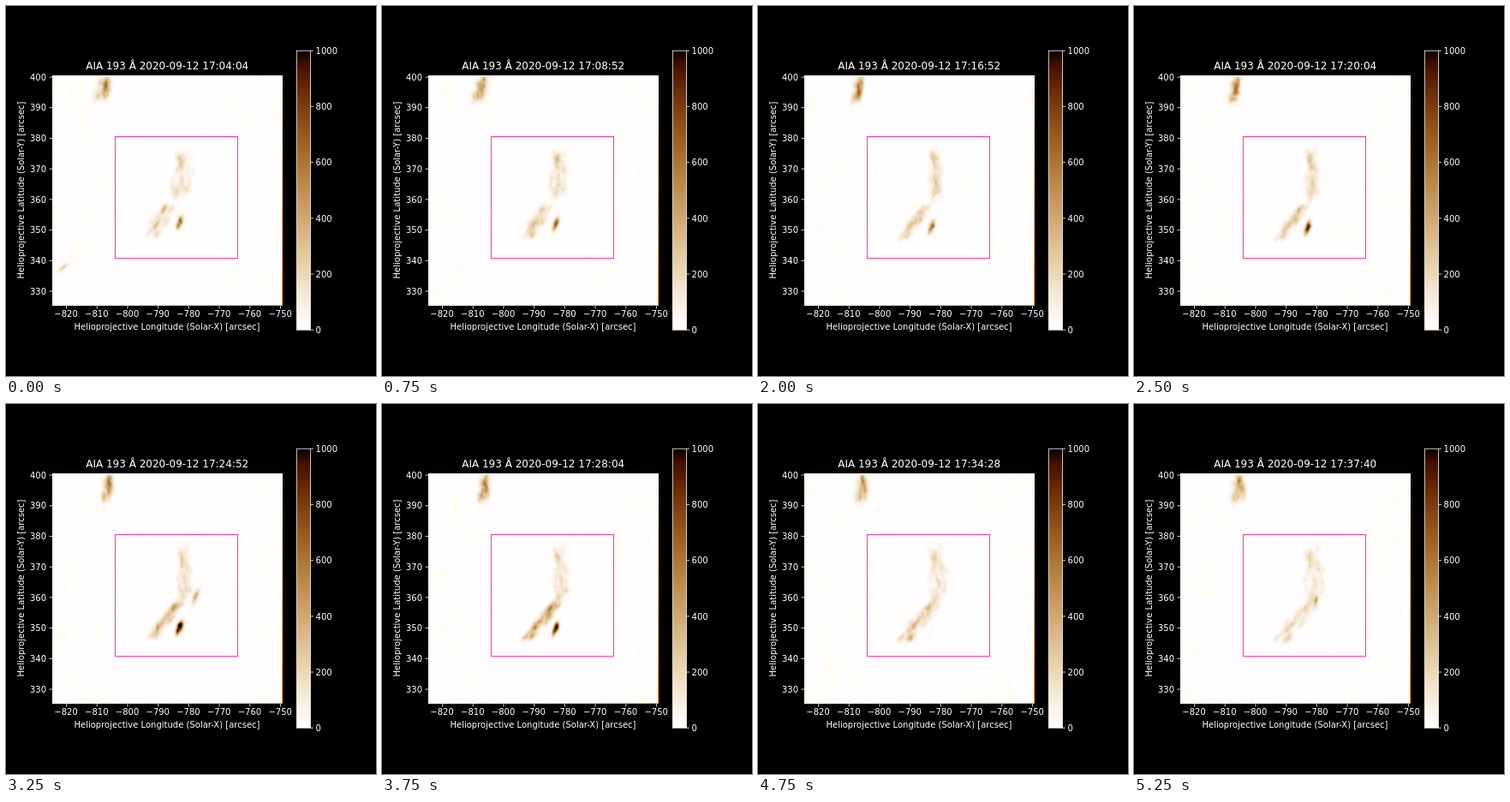
Write an HTML page with a canvas that moves like this. It is 432x432 px and loops after 5.5 s.

```html
<!DOCTYPE html>
<html lang="en">
<head>
<meta charset="utf-8">
<title>AIA 193 Å</title>
<style>
  html, body { margin: 0; width: 100%; height: 100%; overflow: hidden; background: #000; }
  canvas { position: absolute; left: 54px; top: 81px; }
  svg { position: absolute; left: 0; top: 0; }
  text { font-family: "DejaVu Sans", sans-serif; font-size: 10px; fill: #fff; }
  .title { font-size: 12px; }
  .mid { text-anchor: middle; }
  .end { text-anchor: end; }
  line { stroke: #fff; stroke-width: .8; }
  .frame, .roi { fill: none; }
  .roi { stroke: #ff35a0; }
  .bar { stroke: #fff6dc; stroke-width: .8; }
</style>
</head>
<body>
<canvas id="map" width="269" height="269"></canvas>
<svg id="plot" width="432" height="432" viewBox="0 0 432 432">
  <defs>
    <linearGradient id="ramp" x1="0" y1="1" x2="0" y2="0"></linearGradient>
    <linearGradient id="edge" x1="0" y1="0" x2="1" y2="1">
      <stop offset=".5" stop-color="#fffdf4"/>
      <stop offset="1" stop-color="#ff9a30"/>
    </linearGradient>
  </defs>
  <rect class="frame" x="54.5" y="81.5" width="268" height="268" stroke="url(#edge)"/>
  <rect class="roi" x="127.5" y="152.5" width="143" height="142"/>
  <rect class="bar" x="339.3" y="52.2" width="16.2" height="326" fill="url(#ramp)"/>
  <text class="title mid" id="title" x="188.2" y="74"></text>
  <text class="mid" x="188" y="378">Helioprojective Longitude (Solar-X) [arcsec]</text>
  <text class="mid" transform="translate(21 215) rotate(-90)">Helioprojective Latitude (Solar-Y) [arcsec]</text>
</svg>
<script>
const STEP = 250, STEPS = 22, LAST = STEPS - 1, LEFT = 54, TOP = 81;
const START = 17 * 3600 + 4 * 60 + 4, CADENCE = 96;
const svg = document.getElementById('plot');
const title = document.getElementById('title');
const canvas = document.getElementById('map');
const ctx = canvas.getContext('2d');

// Glowing strands: end points at the start and at the end of the loop.
const strands = [
  { from: [109, 108, 118, 84], to: [121, 113, 122, 84], spread: 8, amp: .07 },
  { from: [207, 170, 204, 222], to: [206, 168, 213, 230], spread: 15, amp: .075 },
  { from: [189, 232, 168, 268], to: [209, 231, 168, 276], spread: 10, amp: .06, peak: 16 }
];

// Brief brightenings: step, x, y, tilt, length, strength.
const flashes = [
  [0, 66, 305, 50, 7, .25],
  [0, 184, 237, 20, 5, .2],
  [6, 95, 304, 12, 9, .55],
  [13, 221, 224, 20, 9, .33],
  [17, 63, 325, 25, 7, .24],
  [21, 212, 229, 10, 6, .35]
];

const lerp = (a, b, t) => a + (b - a) * t;
const clamp = v => Math.min(1, Math.max(0, v));
const smooth = t => t * t * (3 - 2 * t);
const bump = (s, at, width) => Math.exp(-(((s - at) / width) ** 2));

function color(v) {
  const c = 1 - Math.pow(clamp(v), 1.2);
  return [255 * Math.sqrt(c), 253 * c, 254 * c * c];
}

function hash(x, y, z) {
  let h = Math.imul(x, 374761393) ^ Math.imul(y, 668265263) ^ Math.imul(z, 1274126177);
  h = Math.imul(h ^ (h >>> 13), 1103515245);
  return ((h ^ (h >>> 16)) >>> 0) / 4294967296;
}

function noise(x, y, z) {
  const ix = Math.floor(x), iy = Math.floor(y);
  const fx = smooth(x - ix), fy = smooth(y - iy);
  return lerp(
    lerp(hash(ix, iy, z), hash(ix + 1, iy, z), fx),
    lerp(hash(ix, iy + 1, z), hash(ix + 1, iy + 1, z), fx), fy);
}

// Puffs scattered along a strand, drawn together halfway through the loop.
function puffs({ from, to, spread, amp, peak }, id, step) {
  const t = step / LAST, count = 28;
  const [x1, y1, x2, y2] = from.map((a, i) => lerp(a, to[i], t));
  const width = spread * (1 - .4 * Math.sin(Math.PI * t));
  const len = Math.hypot(x2 - x1, y2 - y1);
  const nx = (y2 - y1) / len, ny = (x1 - x2) / len;
  const tilt = Math.atan2(x2 - x1, y1 - y2) * 180 / Math.PI;
  const gain = amp * (1 + (peak ? bump(step, peak, 3.5) : 0));
  return Array.from({ length: count }, (_, i) => {
    const p = (i + .5) / count;
    const off = (hash(i, id, 1) + hash(i, id, 2) - 1) * width;
    return {
      x: lerp(x1, x2, p) + nx * off,
      y: lerp(y1, y2, p) + ny * off,
      w: 2.5 + 2 * hash(i, id, 3),
      l: 4 + 4 * hash(i, id, 4),
      tilt,
      amp: gain * (.4 + 1.2 * noise(step / 4, i, id + 20))
    };
  });
}

function kernel(step) {
  const y = 251 + step * .6;
  const amp = (.62 + .65 * bump(step, 13, 3)) * (1 - smooth(clamp((step - 14) / 6)));
  return [
    { x: 203, y, w: 3, l: 6, tilt: 15, amp },
    { x: 200, y: y + 6, w: 2.5, l: 5, tilt: 10, amp: amp * .4 }
  ];
}

function blobsAt(step) {
  const brief = flashes.map(([at, x, y, tilt, l, amp]) =>
    ({ x, y, w: l * .35, l, tilt, amp: amp * clamp(1 - Math.abs(step - at) / 2) }));
  return [...strands.flatMap((s, id) => puffs(s, id, step)), ...kernel(step), ...brief];
}

function addBlob(field, W, H, b) {
  const a = b.tilt * Math.PI / 180, s = Math.sin(a), c = Math.cos(a);
  const r = 2.5 * Math.max(b.w, b.l), x0 = b.x - LEFT, y0 = b.y - TOP;
  for (let y = Math.max(0, Math.ceil(y0 - r)); y < Math.min(H, y0 + r); y++) {
    for (let x = Math.max(0, Math.ceil(x0 - r)); x < Math.min(W, x0 + r); x++) {
      const dx = x - x0, dy = y - y0;
      const u = (dx * c + dy * s) / b.w, v = (dx * s - dy * c) / b.l;
      field[y * W + x] += b.amp * Math.exp(-u * u - v * v);
    }
  }
}

const cache = [];
function mapAt(step) {
  if (cache[step]) return cache[step];
  const W = canvas.width, H = canvas.height;
  const field = new Float32Array(W * H), img = ctx.createImageData(W, H);
  blobsAt(step).forEach(b => addBlob(field, W, H, b));
  for (let y = 0, i = 0; y < H; y++) {
    for (let x = 0; x < W; x++, i++) {
      const grain = .7 + .6 * noise(x / 2.6, y / 4, step + 1);
      const side = Math.abs(2 * x / W - 1);
      const haze = side * Math.max(0, noise(x / 7, y / 16, step + 40) - .6);
      const [r, g, b] = color(field[i] * grain);
      img.data.set([r, g, b - haze * 40, 255], i * 4);
    }
  }
  return cache[step] = img;
}

function add(tag, attrs, text) {
  const el = document.createElementNS('http://www.w3.org/2000/svg', tag);
  for (const name in attrs) el.setAttribute(name, attrs[name]);
  if (text) el.textContent = text;
  return el;
}

function drawAxes() {
  for (let i = 0; i < 8; i++) {
    const x = 70.5 + i * 35.72, y = 83 + i * 35.72;
    svg.append(
      add('line', { x1: x, x2: x, y1: 350, y2: 353.5 }),
      add('text', { x: x - .4, y: 363.3, class: 'mid' }, '\u2212' + (820 - i * 10)),
      add('line', { x1: 50.5, x2: 54, y1: y, y2: y }),
      add('text', { x: 47, y: y + 3.7, class: 'end' }, String(400 - i * 10)));
  }
  for (let i = 0; i <= 5; i++) {
    const y = 378.2 - i * 65.2;
    svg.append(
      add('line', { x1: 355.6, x2: 359, y1: y, y2: y }),
      add('text', { x: 361.6, y: y + 3.8 }, String(i * 200)));
  }
  const ramp = document.getElementById('ramp');
  for (let i = 0; i <= 32; i++) {
    const rgb = color(i / 32).map(Math.round).join();
    ramp.append(add('stop', { offset: i / 32, 'stop-color': `rgb(${rgb})` }));
  }
}

function clock(step) {
  const s = START + step * CADENCE;
  return [s / 3600, s / 60 % 60, s % 60]
    .map(n => String(Math.floor(n)).padStart(2, '0')).join(':');
}

let shown = -1;
function tick() {
  const step = Math.floor(performance.now() / STEP) % STEPS;
  if (step !== shown) {
    shown = step;
    title.textContent = 'AIA 193 Å 2020-09-12 ' + clock(step);
    ctx.putImageData(mapAt(step), 0, 0);
  }
  requestAnimationFrame(tick);
}

drawAxes();
tick();
</script>
</body>
</html>
```
